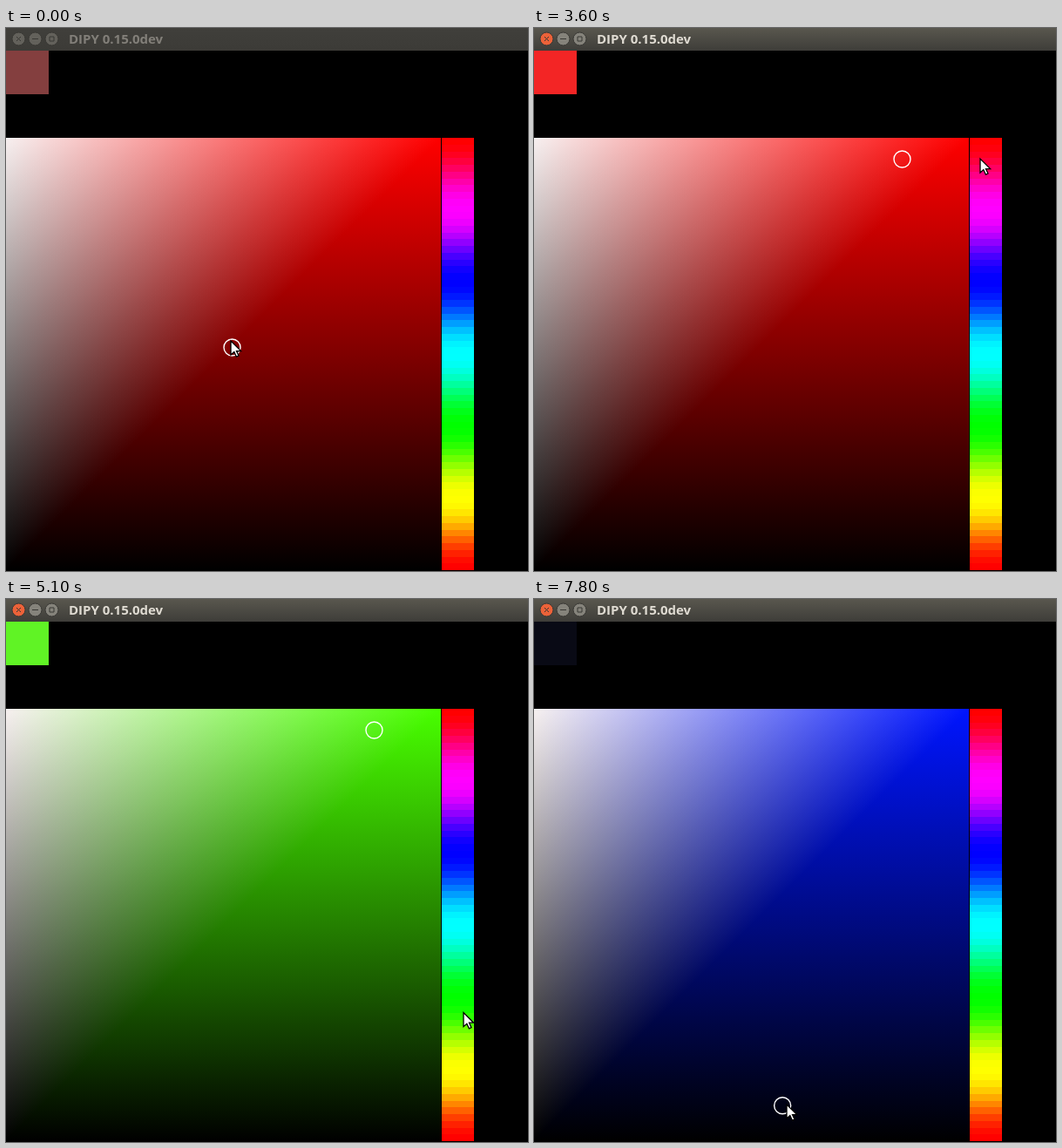
An HTML page with a canvas that plays this animation: 599x623 px, repeating every 8000 ms.

```html
<!DOCTYPE html>
<html lang="en">
<head>
<meta charset="utf-8">
<title>Color picker</title>
<style>
  html, body { margin: 0; width: 100%; height: 100%; overflow: hidden; background: #000; }
  canvas { display: block; }
</style>
</head>
<body>
<canvas id="stage" width="599" height="623"></canvas>
<script>
const ctx = document.getElementById('stage').getContext('2d');
const LOOP = 8000;
const LAG = 15; // the picker trails the pointer by this many ms
const PANEL = { x: 0, y: 126, w: 499, h: 496 };
const BAR = { x: 500, w: 37, bands: 64 };
const WHITE = [247, 240, 240];
const DIM = 0.06;
const COLOR_SET = 2400, HUE_START = 3600, HUE_END = 5600, DRAG_AGAIN = 6000;

// Pointer stops: time, x, y.
const stops = [
  [-LAG, 259, 366], [0, 258, 359], [1200, 24, 178], [COLOR_SET, 422, 150],
  [3000, 422, 150], [HUE_START, 512, 150], [4200, 524, 348], [4600, 529, 528],
  [4800, 530, 585], [HUE_END - 20, 517, 298], [HUE_END, 517, 298],
  [5900, 422, 150], [DRAG_AGAIN, 422, 150], [6900, 30, 560], [7200, 76, 610],
  [7800, 290, 580]
];

const clamp = (v, lo, hi) => Math.max(lo, Math.min(hi, v));

function pointerAt(time) {
  const i = clamp(stops.findIndex(stop => stop[0] > time), 1, stops.length - 1);
  const [a, b] = time >= stops.at(-1)[0] ? stops.slice(-2) : stops.slice(i - 1, i + 1);
  const k = clamp((time - a[0]) / (b[0] - a[0]), 0, 1);
  return [a[1] + (b[1] - a[1]) * k, a[2] + (b[2] - a[2]) * k];
}

function ringAt(time) {
  const parked = time >= COLOR_SET && time <= DRAG_AGAIN;
  return pointerAt(parked ? COLOR_SET : time - LAG);
}

function hueAt(time) {
  if (time <= HUE_START) return 0;
  const y = pointerAt(Math.min(time, HUE_END) - LAG)[1];
  return 1 - (y - PANEL.y) / PANEL.h;
}

// Hue, saturation and value from 0 to 1; channels from 0 to 255.
function hsv(h, s, v) {
  return [5, 3, 1].map(n => {
    const k = (n + h * 6) % 6;
    return 255 * v * (1 - s * clamp(Math.min(k, 4 - k), 0, 1));
  });
}

const css = color => `rgb(${color.map(Math.round).join(',')})`;
const sCurve = c => 127.5 * (1 - Math.cos(Math.PI * c / 255));

function fillGradient(x, y, w, h, dx, dy, from, to) {
  const gradient = ctx.createLinearGradient(x, y, x + dx, y + dy);
  gradient.addColorStop(0, from);
  gradient.addColorStop(1, to);
  ctx.fillStyle = gradient;
  ctx.fillRect(x, y, w, h);
}

function drawTitleBar(focused) {
  fillGradient(0, 0, 599, 26, 0, 26,
    focused ? '#59574e' : '#403f3b', focused ? '#3e3d39' : '#3c3b37');

  const grey = focused ? '#85837b' : '#63615b';
  ctx.strokeStyle = '#393834';
  ctx.lineWidth = 1;
  for (let i = 0; i < 3; i++) {
    ctx.fillStyle = focused && i === 0 ? '#ec6239' : grey;
    ctx.beginPath();
    ctx.arc(14.5 + 19 * i, 12.5, 7.5, 0, Math.PI * 2);
    ctx.fill();
    ctx.stroke();
  }
  ctx.stroke(new Path2D('M12 10l5 5m0-5l-5 5M30 12.5h7M50 10h5v5h-5z'));

  ctx.fillStyle = focused ? '#dfdbd2' : '#827f79';
  ctx.font = 'bold 15px "Open Sans", "Noto Sans", sans-serif';
  ctx.fillText('DIPY 0.15.0dev', 72, 18);
}

function drawPanel(hue) {
  const { x, y, w, h } = PANEL;
  const pure = hsv(hue, 1, 1);
  const n = 1 / (w * w) + 1 / (h * h);
  const fillAboveDiagonal = (from, to) =>
    fillGradient(x, y, w, h, 1 / (w * n), 1 / (h * n), from, to);

  fillGradient(x, y, w, h, 0, h, css(pure), '#000');
  // Light added above the diagonal gives two smoothly shaded triangles.
  fillAboveDiagonal(`rgba(0,0,0,${DIM})`, 'rgba(0,0,0,0)');
  ctx.globalCompositeOperation = 'lighter';
  fillAboveDiagonal(css(WHITE.map((c, i) => c - pure[i] * (1 - DIM))), '#000');
  ctx.globalCompositeOperation = 'source-over';
}

function drawHueBar() {
  const edge = i => Math.round(PANEL.y + i * PANEL.h / BAR.bands);
  for (let i = 0; i < BAR.bands; i++) {
    ctx.fillStyle = css(hsv(1 - (i + 0.5) / BAR.bands, 1, 1).map(sCurve));
    ctx.fillRect(BAR.x, edge(i), BAR.w, edge(i + 1) - edge(i));
  }
}

function drawRing(x, y) {
  ctx.strokeStyle = '#fff';
  ctx.lineWidth = 1.4;
  ctx.beginPath();
  ctx.arc(x + 0.5, y + 0.5, 9.5, 0, Math.PI * 2);
  ctx.stroke();
}

const arrow = new Path2D('M0 0V16L3.8 12.6L6.4 18.2L9 17L6.5 11.6H11.6Z');

function drawPointer(x, y) {
  ctx.save();
  ctx.translate(x, y);
  ctx.fillStyle = '#fff';
  ctx.strokeStyle = '#000';
  ctx.lineWidth = 1.3;
  ctx.fill(arrow);
  ctx.stroke(arrow);
  ctx.restore();
}

function draw(time) {
  const step = time < DRAG_AGAIN ? 100 : 300;
  const t = Math.floor(time / step) * step;
  const hue = hueAt(t);
  const [ringX, ringY] = ringAt(t);

  ctx.fillStyle = '#000';
  ctx.fillRect(0, 0, 599, 623);
  drawTitleBar(t >= 100);
  ctx.fillStyle = css(hsv(hue, ringX / PANEL.w, 1 - (ringY - PANEL.y) / PANEL.h));
  ctx.fillRect(0, 26, 49, 50);
  drawPanel(hue);
  drawHueBar();
  drawRing(ringX, ringY);
  drawPointer(...pointerAt(t));
}

function tick() {
  draw(performance.now() % LOOP);
  requestAnimationFrame(tick);
}
tick();
</script>
</body>
</html>
```
